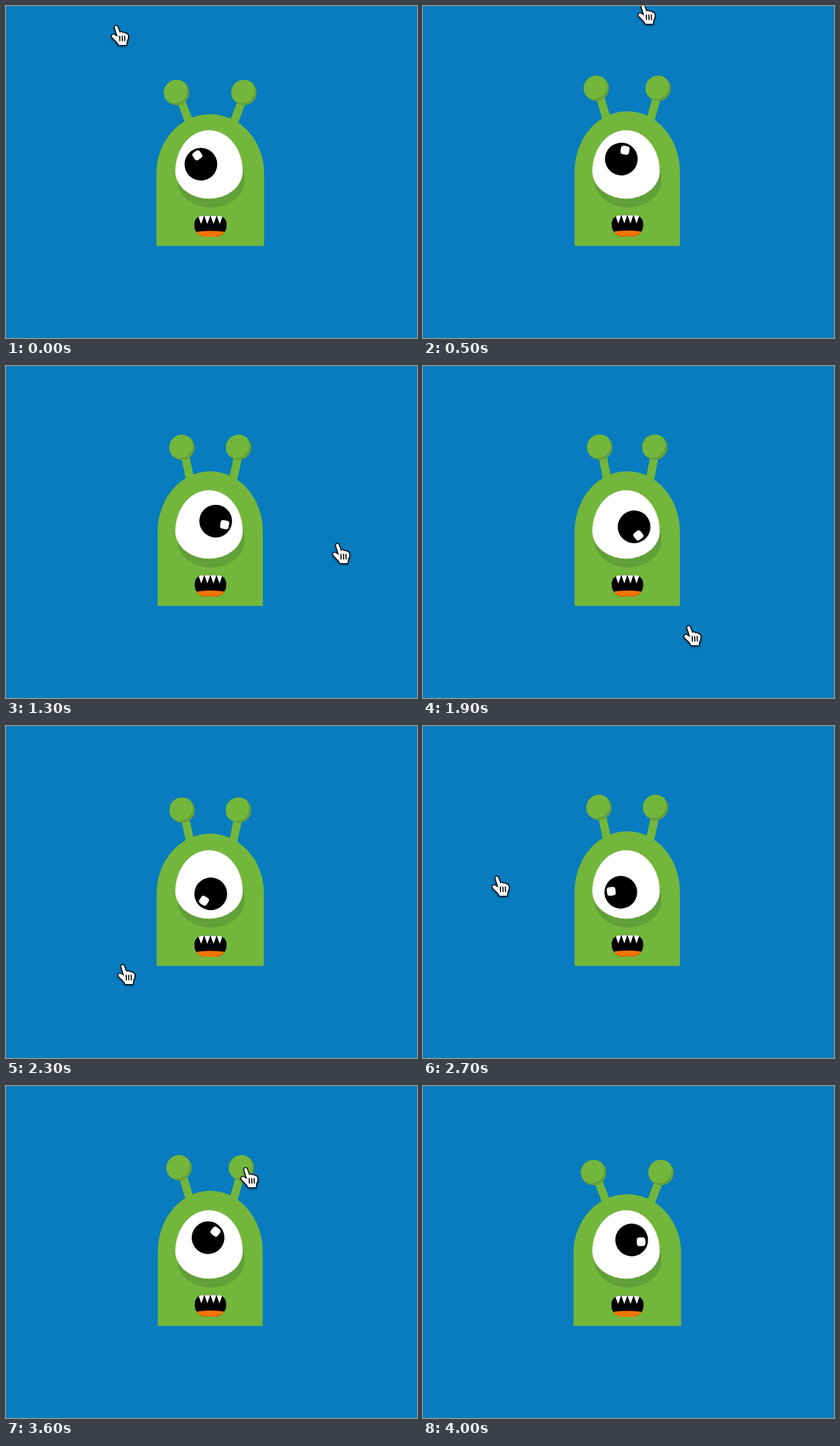
These frames come from a looping animation (600x485 px, 4.1 s). An HTML page with a canvas:

```html
<!DOCTYPE html>
<html lang="en">
<head>
<meta charset="utf-8">
<title>Curious alien</title>
<style>
  html, body { margin: 0; width: 100%; height: 100%; overflow: hidden; background: #087cbe; }
  canvas { display: block; }
</style>
</head>
<body>
<canvas id="stage" width="600" height="485"></canvas>
<script>
const ctx = document.getElementById('stage').getContext('2d');
const LOOP = 4100, STEP = 100, BOUNCE = 800, SWAY = 4000;
const BLUE = '#087cbe', GREEN = '#72b73c', SHADE = '#63a038';
const EYE = { x: 296.4, y: 241.4 }, PUPIL_ORBIT = { x: 296.3, y: 233.5 };
const LOOK_FROM = { x: 269, y: 211 };
const rad = deg => deg * Math.PI / 180;

// The hand circles the alien once: time, tip x, tip y
const handPath = [
  [0, 161, 29], [500, 321, -2], [1000, 462, 140], [1300, 484, 260], [1900, 388, 380],
  [2400, 126, 330], [2700, 108, 220], [3100, 135, 113], [3600, 350, 120], [4000, 640, 225]
];

// Cubic Hermite curve through the key points
function follow(path, t) {
  const last = path.length - 1;
  const next = Math.max(1, path.findIndex(point => point[0] >= t));
  const [p, q] = [path[next - 1], path[next]];
  const span = q[0] - p[0], u = (t - p[0]) / span, w = 1 - u;
  const slope = (n, axis) => {
    const a = path[Math.max(0, n - 1)], b = path[Math.min(last, n + 1)];
    return (b[axis] - a[axis]) / (b[0] - a[0]);
  };
  const [x, y] = [1, 2].map(axis =>
    p[axis] * w * w * (1 + 2 * u) + q[axis] * u * u * (3 - 2 * u)
    + span * u * w * (slope(next - 1, axis) * w - slope(next, axis) * u));
  return { x, y };
}

function fill(color, build) {
  ctx.fillStyle = color;
  ctx.beginPath();
  build();
  ctx.fill();
}

function disc(color, x, y, r) {
  fill(color, () => ctx.arc(x, y, r, 0, Math.PI * 2));
}

function egg(color, x, y) {
  fill(color, () => {
    ctx.ellipse(x, y, 49.2, 60, 0, Math.PI, Math.PI * 2);
    ctx.ellipse(x, y, 49.2, 40.2, 0, 0, Math.PI);
  });
}

function antenna(side, angle, sx, sy) {
  const x = side * (28 + 54.3 * Math.sin(angle)) * sx;
  const y = -(174 + 54.3 * Math.cos(angle)) * sy;
  ctx.strokeStyle = GREEN;
  ctx.lineWidth = 12;
  ctx.beginPath();
  ctx.moveTo(side * 30 + 2, -174 * sy);
  ctx.lineTo(x + 2, y);
  ctx.stroke();

  ctx.save();
  disc(SHADE, x, y, 18.5);
  ctx.clip();
  disc(GREEN, x - 3, y - 3, 18.5);
  ctx.restore();
}

function mouth() {
  ctx.save();
  fill('#000', () => ctx.roundRect(-23.2, -43.8, 47, 30.4, [12, 12, 16, 16]));
  ctx.clip();
  fill('#fff', () => {
    for (let i = 0; i < 4; i++) {
      const left = -18 + i * 9.1;
      ctx.moveTo(left, -44.5);
      ctx.lineTo(left + 4.55, -32);
      ctx.lineTo(left + 9.1, -44.5);
    }
  });
  fill('#fb7407', () => ctx.ellipse(.3, -12.5, 38, 9.4, 0, 0, Math.PI * 2));
  ctx.restore();
}

function alien(t) {
  const stretch = .026 * (1 - Math.cos(2 * Math.PI * t / BOUNCE)) / 2;
  const sx = 1 - stretch, sy = 1 + stretch;
  const angle = rad(23 - 9.1 * Math.sin(Math.PI * t / SWAY));
  ctx.save();
  ctx.translate(298.2, 350.4);
  antenna(-1, angle, sx, sy);
  antenna(1, angle, sx, sy);
  ctx.scale(sx, sy);
  fill(GREEN, () => {
    ctx.moveTo(-78.6, 0);
    ctx.ellipse(0, -106, 78.6, 86.4, 0, Math.PI, Math.PI * 2);
    ctx.lineTo(78.6, 0);
  });
  mouth();
  ctx.restore();
}

function eye(target) {
  egg(SHADE, EYE.x + 3, EYE.y + 13);
  egg('#fff', EYE.x, EYE.y);
  const angle = Math.atan2(target.y - LOOK_FROM.y, target.x - LOOK_FROM.x) - rad(48);
  ctx.save();
  ctx.translate(PUPIL_ORBIT.x, PUPIL_ORBIT.y);
  ctx.rotate(angle);
  disc('#000', 12, 0, 23.9);
  ctx.translate(12, 0);
  ctx.rotate(rad(45));
  fill('#fff', () => ctx.roundRect(7.4, -3.4, 12.6, 12.6, 4));
  ctx.restore();
}

function hand({ x, y }) {
  ctx.save();
  ctx.translate(x, y);
  ctx.lineJoin = ctx.lineCap = 'round';
  const outline = new Path2D(
    'M-2 3 C-3 -1 1 -1 2 2 L5 10 Q8 8 9.5 10.5 Q12.5 9 13.5 11.5 Q16.5 11 17 14' +
    ' Q18 18 15.5 22 L14.5 28 L4 28 Q2 24 -1.5 21 L-6 16.5 Q-7.5 13 -4 12.5 L2 16 Z');
  ctx.shadowColor = 'rgba(0,0,0,.5)';
  ctx.shadowBlur = 3;
  ctx.shadowOffsetY = 1.5;
  ctx.strokeStyle = '#000';
  ctx.lineWidth = 2.6;
  ctx.stroke(outline);
  ctx.shadowColor = 'transparent';
  ctx.fillStyle = '#fff';
  ctx.fill(outline);
  ctx.lineWidth = 1.6;
  ctx.beginPath();
  for (let i = 0; i < 3; i++) {
    ctx.moveTo(5 + i * 3.6, 15);
    ctx.lineTo(5.3 + i * 3.6, 22);
  }
  ctx.stroke();
  ctx.restore();
}

function draw(now) {
  const t = Math.floor(now % LOOP / STEP) * STEP;
  const tip = follow(handPath, t);
  ctx.fillStyle = BLUE;
  ctx.fillRect(0, 0, 600, 485);
  alien(t);
  eye(tip);
  hand(tip);
}

let start;
function frame(now) {
  start ??= now;
  draw(now - start);
  requestAnimationFrame(frame);
}
draw(0);
requestAnimationFrame(frame);
</script>
</body>
</html>
```
